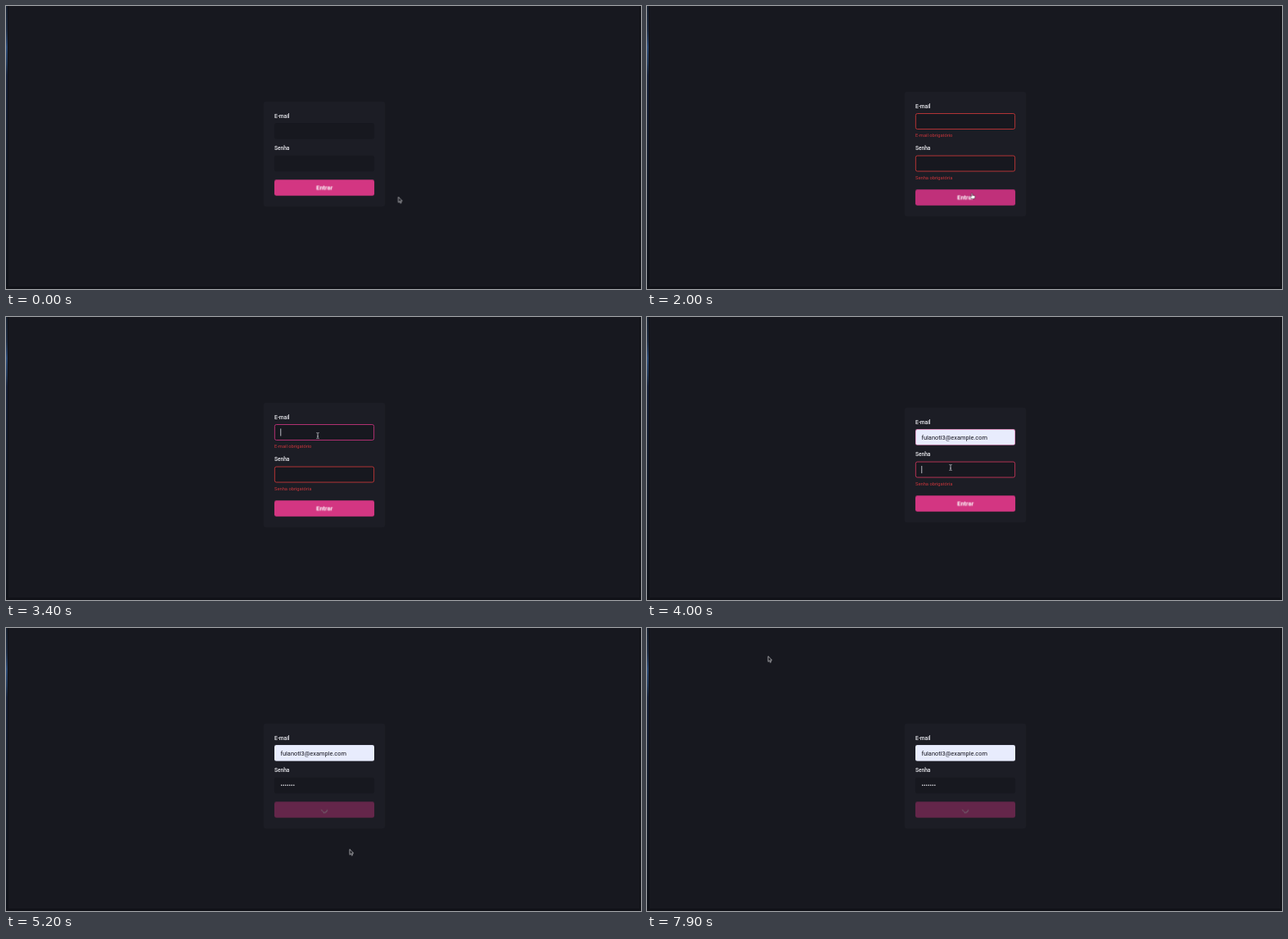
These frames come from a looping animation (776x346 px, 8 s). An HTML page:

```html
<!DOCTYPE html>
<html lang="pt-BR">
<head>
<meta charset="utf-8">
<title>Login</title>
<style>
:root {
  --page: #17181f; --card: #1c1d25;
  --pink: #d33682; --pink-dark: #c0307a; --red: #d23a3a;
  --loop: 8s infinite;
}
* { box-sizing: border-box; }
html, body { margin: 0; width: 100%; height: 100%; overflow: hidden; background: var(--page); }
.stage { position: relative; width: 776px; height: 346px; overflow: hidden; font-family: Roboto, sans-serif; }

/* Screen edges */
.edge { position: absolute; background: #111218; }
.left {
  left: 0; top: 0; width: 3px; height: 100%; border-right: 1px solid #101116;
  background: linear-gradient(#16202f, #1d2c44 30px, #2b4a77 50px, #223a5c 70px, #14203a 85px, #101828 200px, #0d1119);
}
.right { right: 0; top: 0; width: 2px; height: 100%; }
.bottom { left: 0; bottom: 0; width: 100%; height: 3px; }

/* The form is laid out at full size, then scaled to the stage */
.card {
  position: absolute; left: 389.25px; top: 181px; width: 360px; padding: 32px;
  border-radius: 8px; background: var(--card); color: #ededf2;
  transform: translate(-50%, -50%) scale(.4125);
}
label { display: block; height: 24px; margin-bottom: 8px; font: 500 16px/24px Roboto, sans-serif; }
.second { margin-top: 16px; }
.input {
  display: flex; align-items: center; height: 48px; padding-left: 16px;
  border: 2px solid transparent; border-radius: 6px; background: var(--page); font-size: 18px;
}
.error { height: 0; overflow: hidden; color: #c8353b; font-size: 14px; line-height: 21px; }
.error span { display: block; padding-top: 8px; }
.address { color: #14141c; opacity: 0; animation: filled var(--loop) step-end; }
.dots { width: 0; overflow: hidden; white-space: nowrap; animation: typing var(--loop); }
.caret { width: 2px; height: 22px; background: #dcdce4; opacity: 0; }
.email { animation: email-border var(--loop) linear, email-fill var(--loop) step-end; }
.email .caret { position: absolute; animation: email-caret var(--loop) step-end; }
.email + .error { animation: email-error var(--loop) step-end; }
.password { animation: password-border var(--loop) linear; }
.password .caret { animation: password-caret var(--loop) step-end; }
.password + .error { animation: password-error var(--loop) step-end; }

.button {
  position: relative; height: 48px; margin-top: 24px; border-radius: 6px; background: var(--pink);
  color: #fff; font: 700 18px/48px Roboto, sans-serif; text-align: center;
  animation: button var(--loop) step-end;
}
.button span { animation: caption var(--loop) step-end; }
.spinner {
  position: absolute; left: 50%; top: 50%; width: 18px; height: 18px; margin: -9px;
  border: 2px solid #fff; border-bottom-color: transparent; border-left-color: transparent;
  border-radius: 50%; opacity: 0;
  animation: spinner var(--loop) step-end, spin var(--loop) linear;
}

.pointer { position: absolute; left: 0; top: 0; width: 1px; height: 1px; overflow: visible; animation: move var(--loop) ease-in-out; }
.arrow { animation: arrow var(--loop) step-end; }
.hand { animation: hand var(--loop) step-end; }
.beam { animation: beam var(--loop) step-end; }

@keyframes move {
  0%, .5% { transform: translate(479.5px, 233.5px); }
  2.5%, 6.25% { transform: translate(451px, 225px); }
  11%, 25% { transform: translate(397.5px, 229px); }
  28.75%, 43.75% { transform: translate(381px, 145px); }
  48%, 55% { transform: translate(371px, 184px); }
  61.9% { transform: translate(371px, 180px); }
  65%, 66.25% { transform: translate(420px, 270.5px); }
  72.5%, 73% { transform: translate(388px, 247px); }
  80%, 83.75% { transform: translate(147.5px, 35px); }
  88%, 100% { transform: translate(148px, 34.5px); }
}
@keyframes arrow {
  0%, 25.6%, 62.4% { opacity: 1; }
  6.8%, 28% { opacity: 0; }
  100% { opacity: 1; }
}
@keyframes hand {
  0%, 25.6%, 100% { opacity: 0; }
  6.8% { opacity: 1; }
}
@keyframes beam {
  0%, 52.5%, 62.4%, 100% { opacity: 0; }
  28%, 61.9% { opacity: 1; }
}
@keyframes email-border {
  0%, 21.2% { border-color: transparent; }
  21.25%, 29.9% { border-color: var(--red); }
  30%, 48.75% { border-color: var(--pink); }
  51.25%, 100% { border-color: transparent; }
}
@keyframes password-border {
  0%, 21.2% { border-color: transparent; }
  21.25%, 48.75% { border-color: var(--red); }
  51.25%, 62.4% { border-color: var(--pink); }
  63.75%, 100% { border-color: transparent; }
}
@keyframes email-fill {
  0% { background-color: var(--page); }
  43.75%, 100% { background-color: #e8ecfd; }
}
@keyframes filled {
  0% { opacity: 0; }
  43.75%, 100% { opacity: 1; }
}
@keyframes email-error {
  0%, 43.75%, 100% { height: 0; }
  21.25% { height: 29px; }
}
@keyframes password-error {
  0%, 52.5%, 100% { height: 0; }
  21.25% { height: 29px; }
}
@keyframes email-caret {
  0%, 36.2%, 43.75%, 100% { opacity: 0; }
  30%, 42.5% { opacity: 1; }
}
@keyframes password-caret {
  0%, 62.5%, 100% { opacity: 0; }
  48.75% { opacity: 1; }
}
@keyframes typing {
  0%, 51.25% { width: 0; animation-timing-function: steps(7); }
  60%, 100% { width: 43px; }
}
@keyframes button {
  0%, 25.6% { background-color: var(--pink); opacity: 1; }
  6.8% { background-color: var(--pink-dark); opacity: 1; }
  62.5%, 100% { background-color: var(--pink); opacity: .4; }
}
@keyframes caption {
  0% { opacity: 1; }
  62.5%, 100% { opacity: 0; }
}
@keyframes spinner {
  0% { opacity: 0; }
  62.5%, 100% { opacity: 1; }
}
/* One turn every 450 ms */
@keyframes spin {
  0%, 62.5% { transform: rotate(-25deg); }
  100% { transform: rotate(2375deg); }
}
</style>
</head>
<body>
<div class="stage">
  <div class="edge left"></div>
  <div class="edge right"></div>
  <div class="edge bottom"></div>

  <div class="card">
    <label>E-mail</label>
    <div class="input email"><i class="caret"></i><span class="address">fulanotl3@example.com</span></div>
    <div class="error"><span>E-mail obrigatório</span></div>
    <label class="second">Senha</label>
    <div class="input password"><span class="dots">•••••••</span><i class="caret"></i></div>
    <div class="error"><span>Senha obrigatória</span></div>
    <div class="button"><span>Entrar</span><i class="spinner"></i></div>
  </div>

  <svg class="pointer">
    <path class="arrow" d="M0 0V6.6L1.5 5.3 2.5 7.6 3.6 7.1 2.6 4.9H4.7Z" fill="#111218" stroke="#d8d8dc" stroke-width=".7"/>
    <path class="hand" d="M-.9.4Q-.3-.5.3.4V2.4L2.8 2.9Q3.6 3.2 3.4 4.2L2.7 6.8H-.7L-2.4 4.4Q-2.6 3.4-1.6 3.6L-.9 4.1Z" fill="#fff" stroke="#1a1218" stroke-width=".5"/>
    <path class="beam" d="M-1.6-3.4Q-.3-3.4 0-2.7Q.3-3.4 1.6-3.4M0-2.7V2.7M-1.6 3.4Q-.3 3.4 0 2.7Q.3 3.4 1.6 3.4M-.8.9H.8" fill="none" stroke="#d0d0d6" stroke-width=".8"/>
  </svg>
</div>
</body>
</html>
```
